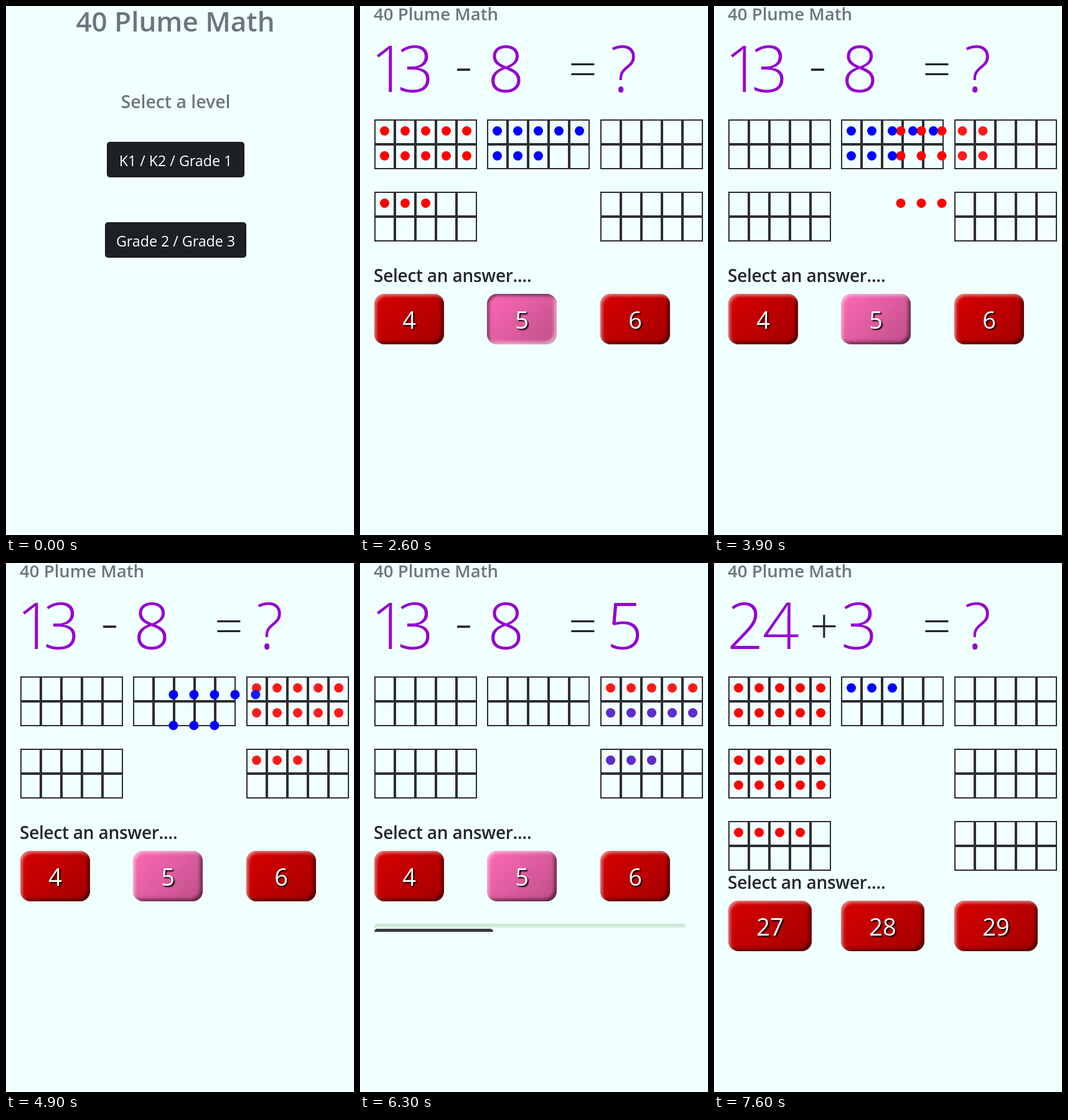
An HTML page with a canvas that plays this animation: 559 px wide and 849 px high, repeating every 8000 ms.

```html
<!DOCTYPE html>
<html lang="en">
<head>
<meta charset="utf-8">
<title>40 Plume Math</title>
<style>
  html, body { margin: 0; width: 100%; height: 100%; overflow: hidden; background: #f0ffff; }
  canvas { position: absolute; left: 0; top: 0; }
  .answer {
    position: absolute; height: 81px; border-radius: 16px;
    font: 38px/83px "Open Sans", "Noto Sans", sans-serif;
    text-align: center; color: #fff; text-shadow: 2px 2px 2px #000;
    background: linear-gradient(135deg, #d80000, #a40000);
    box-shadow: inset 3px 3px 5px rgba(255,255,255,.5), inset -4px -4px 5px rgba(0,0,0,.5);
  }
  .chosen { background: linear-gradient(135deg, #ff69b4, #bd4f8a); }
  .pressed { box-shadow: inset 3px 3px 5px rgba(0,0,0,.5), inset -4px -4px 5px rgba(255,255,255,.5); }
</style>
</head>
<body>
<canvas id="stage" width="559" height="849"></canvas>
<div class="answer"></div>
<div class="answer"></div>
<div class="answer"></div>
<script>
const LOOP = 8000;
const COLUMNS = [23, 204, 386];
const INK = '#212529', GREY = '#6c757d', DARK = '#343a40', PRESSED = '#1d2124', EDGE = '#171a1d';
const ctx = document.getElementById('stage').getContext('2d');
const answers = [...document.querySelectorAll('.answer')];

const clamp = v => Math.max(0, Math.min(1, v));
const ramp = (t, from, to) => clamp((t - from) / (to - from));
const swing = p => 0.5 - Math.cos(p * Math.PI) / 2;

function text(str, x, y, size, color, weight = 400, align = 'left', spacing = 0) {
  ctx.font = `${weight} ${size}px "Open Sans", "Noto Sans", sans-serif`;
  ctx.letterSpacing = spacing + 'px';
  ctx.textAlign = align;
  ctx.fillStyle = color;
  ctx.fillText(str, x, y);
}

function box(x, y, w, h, fill, radius = 5) {
  ctx.beginPath();
  ctx.roundRect(x, y, w, h, radius);
  ctx.fillStyle = fill;
  ctx.fill();
}

function outline(color, width) {
  ctx.strokeStyle = color;
  ctx.lineWidth = width;
  ctx.stroke();
}

function clipped(x, y, w, h, draw) {
  ctx.save();
  ctx.beginPath();
  ctx.rect(x, y, w, h);
  ctx.clip();
  draw();
  ctx.restore();
}

function levelButton(label, x, y, w) {
  box(x, y, w, 57, EDGE);
  box(x + 2, y + 2, w - 4, 53, PRESSED, 3);
  text(label, x + w / 2, y + 39, 23.2, '#fff', 400, 'center');
}

function grid(x, y) {
  ctx.strokeStyle = '#2d2e31';
  ctx.lineWidth = 2;
  for (let i = 0; i < 10; i++)
    ctx.strokeRect(x + 1 + 33 * (i % 5), y + 1 + 40 * Math.floor(i / 5), 31, 38);
}

// Centre of the i-th counter in a column of stacked ten-cell grids.
function slot(column, i) {
  return [
    COLUMNS[column] + 16.5 + 33 * (i % 5),
    200.5 + 116 * Math.floor(i / 10) + 40 * Math.floor(i % 10 / 5)
  ];
}

function dot([x, y], color, alpha = 1) {
  ctx.globalAlpha = alpha;
  ctx.beginPath();
  ctx.arc(x, y, 7.5, 0, 7);
  ctx.fillStyle = color;
  ctx.fill();
  ctx.globalAlpha = 1;
}

function travel(from, to, p) {
  return from.map((v, k) => v + (to[k] - v) * p);
}

function counters(q, t) {
  const red = t > 2600 ? clamp(0.195 * (t - 2564) / 363) : 0;
  const blue = 0.428 * ramp(t, 4408, 5200) + 0.572 * ramp(t, 5200, 6100);
  const fade = clamp((7050 - t) / 1070);
  const moving = !q.still;
  for (let i = 0; i < q.red; i++)
    dot(travel(slot(0, i), slot(2, i), moving ? red : 0), '#f00', moving && i >= 5 ? fade : 1);
  for (let i = 0; i < q.blue; i++)
    dot(travel(slot(1, i), slot(2, i + 5), moving ? blue : 0), '#00f', moving ? fade : 1);
}

function levelScreen(t) {
  text('40 Plume Math', 272, 41, 44, GREY, 600, 'center');
  text('Select a level', 272.5, 164, 28.4, GREY, 600, 'center');
  levelButton('K1 / K2 / Grade 1', 162, 218, 221);
  if (t >= 500) {
    box(159, 347, 227, 57, PRESSED);
    outline('rgba(82,88,93,.5)', 4);
  }
  levelButton('Grade 2 / Grade 3', 159, 347, 227);
}

function feedback(t) {
  const p = swing(ramp(t, 6206, 6700));
  if (!p) return;
  clipped(22, 578, 502, 1 + 71 * p, () => {
    box(24, 580, 498, 68, '#d4edda');
    outline('#c3e6cb', 2);
    text('Well done!', 272.5, 623, 34.6, '#155724', 600, 'center');
  });
  const top = Math.round(579 + 94 * p);
  clipped(23, top, 191, Math.round(57 * p), () => {
    box(23, top, 191, 57, t >= 7300 ? PRESSED : DARK);
    text('Next Question', 118.5, top + 39, 23, '#fff', 400, 'center');
  });
}

const questions = [
  {
    digits: [['1', 17], ['3', 60], ['8', 205]], sign: ['-', 152, 127, 90],
    red: 13, blue: 8, rows: 2, prompt: 443, options: [4, 5, 6], width: 112
  },
  {
    digits: [['2', 21], ['4', 78], ['3', 204]], sign: ['+', 154, 130, 80],
    red: 24, blue: 3, rows: 3, prompt: 523, options: [27, 28, 29], width: 134, still: true
  }
];

function questionScreen(q, t) {
  text('40 Plume Math', 22, 23, 27.6, GREY, 600);
  const solved = t >= 6200 && !q.still;
  const result = solved ? ['5', 396] : ['?', 402];
  for (const [glyph, x] of [...q.digits, result])
    text(glyph, x, 137.5, 103, '#9400d3', 300);
  const [sign, x, y, size] = q.sign;
  text(sign, x, y, size, INK, 300);
  text('=', 335, 130, 80, INK, 300);

  for (let row = 0; row < q.rows; row++) {
    const y = 182 + 116 * row;
    grid(COLUMNS[0], y);
    if (!row) grid(COLUMNS[1], y);
  }
  counters(q, t);
  // The answer grids lie over the counters with a faint tint.
  for (let row = 0; row < q.rows; row++) {
    const y = 182 + 116 * row;
    box(COLUMNS[2], y, 165, 80, 'rgba(240,255,255,.1)', 0);
    grid(COLUMNS[2], y);
  }
  text('Select an answer....', 22, q.prompt, 28, INK, 600, 'left', -0.25);
  if (!q.still) feedback(t);
}

function showAnswers(q, t) {
  answers.forEach((el, i) => {
    el.hidden = !q;
    if (!q) return;
    const chosen = !q.still && i === 1 && t >= 2600;
    el.textContent = q.options[i];
    el.style.left = COLUMNS[i] + 'px';
    el.style.top = q.prompt + 19 + 'px';
    el.style.width = q.width + 'px';
    el.classList.toggle('chosen', chosen);
    el.classList.toggle('pressed', chosen && t < 2700);
  });
}

function frame() {
  // The picture advances in steps of a tenth of a second.
  const t = Math.floor(performance.now() % LOOP / 100) * 100;
  const q = t < 700 ? null : questions[t < 7400 ? 0 : 1];
  ctx.fillStyle = '#f0ffff';
  ctx.fillRect(0, 0, 559, 849);
  if (q) questionScreen(q, t);
  else levelScreen(t);
  showAnswers(q, t);
  requestAnimationFrame(frame);
}
frame();
</script>
</body>
</html>
```
